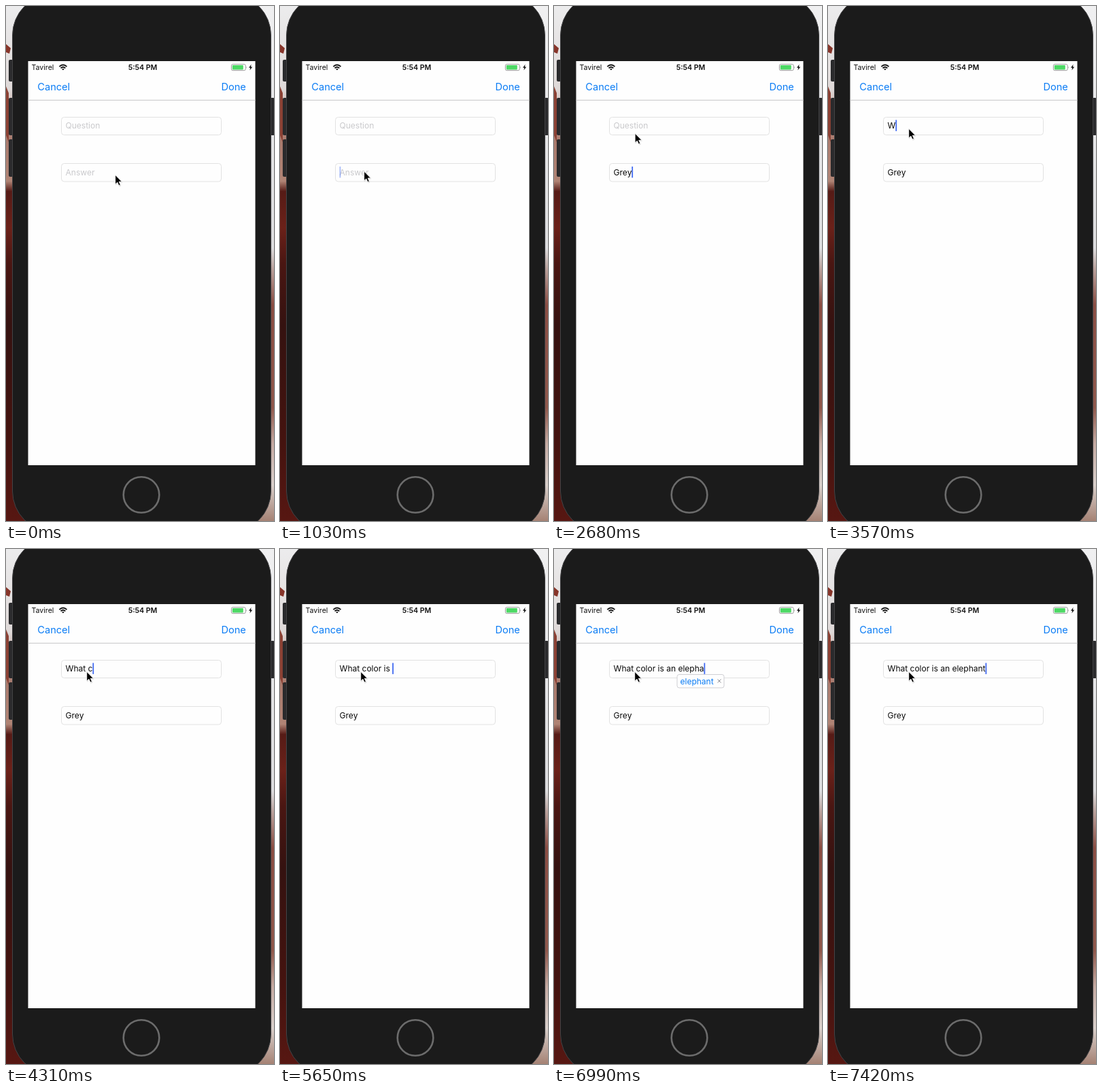
An HTML page for the animation above (8000 ms loop, 394 by 757 pixels).

```html
<!DOCTYPE html>
<html lang="en">
<head>
<meta charset="utf-8">
<title>Flashcard form</title>
<style>
  html, body { margin: 0; width: 100%; height: 100%; overflow: hidden; background: #e8e8e9; }
  svg { display: block; width: 100vw; height: 100vh; }
  text { font-family: Inter, Roboto, sans-serif; white-space: pre; }
  .nav { font-size: 14.6px; fill: #0a7cf5; }
  .status { font-size: 10.6px; fill: #111; }
  .field { font-size: 12px; }
  .box { fill: #fefefe; stroke: #e2e2e2; }
</style>
</head>
<body>
<svg viewBox="0 0 394 757">
  <defs>
    <linearGradient id="left" x2="0" y2="1">
      <stop offset="0" stop-color="#ececed"/>
      <stop offset=".16" stop-color="#dfd9d8"/>
      <stop offset=".26" stop-color="#a8796c"/>
      <stop offset=".34" stop-color="#b08475"/>
      <stop offset=".36" stop-color="#561b16"/>
      <stop offset=".43" stop-color="#6b2119"/>
      <stop offset=".5" stop-color="#4a1612"/>
      <stop offset=".62" stop-color="#351210"/>
      <stop offset=".85" stop-color="#45130f"/>
      <stop offset="1" stop-color="#571712"/>
    </linearGradient>
    <linearGradient id="right" x2="0" y2="1">
      <stop offset="0" stop-color="#f0f0f1"/>
      <stop offset=".47" stop-color="#dcdcde"/>
      <stop offset=".51" stop-color="#b9a19c"/>
      <stop offset=".58" stop-color="#8a4d43"/>
      <stop offset=".78" stop-color="#8f584c"/>
      <stop offset=".85" stop-color="#c4aaa2"/>
      <stop offset=".93" stop-color="#d8cfcb"/>
      <stop offset="1" stop-color="#a58274"/>
    </linearGradient>
  </defs>

  <rect width="197" height="757" fill="url(#left)"/>
  <rect x="197" width="197" height="757" fill="url(#right)"/>
  <path d="M0 56 7 62 5 70 0 68Z" fill="#87352a"/>
  <path d="M0 118 4 128V200L0 190Z" fill="#8b4134"/>

  <g fill="#2a2a2c">
    <rect x="4" y="79" width="9" height="32" rx="2"/>
    <rect x="4" y="135" width="9" height="55" rx="2"/>
    <rect x="4" y="196" width="9" height="55" rx="2"/>
    <rect x="386" y="135" width="9" height="55" rx="2"/>
  </g>
  <rect x="9.5" y="-17" width="380" height="790" rx="60" fill="#1b1b1b" stroke="#444446"/>
  <circle cx="199" cy="718.5" r="26.3" fill="none" stroke="#6c6c6c" stroke-width="2.6"/>
  <rect x="32.5" y="81" width="334" height="594" fill="#fefefe"/>
  <path d="M32.5 138.4H366.5" stroke="#c6c6c8"/>

  <text class="status" x="37.5" y="94">Tavirel</text>
  <text class="status" x="201" y="94" text-anchor="middle" font-weight="600">5:54 PM</text>
  <g fill="none" stroke="#111" stroke-width="1.9">
    <path d="M78.4 89.1Q83.9 83.8 89.4 89.1M80.5 91.4Q83.9 88.3 87.3 91.4"/>
    <path d="M82 92.6Q83.9 91.2 85.8 92.6L83.9 94.6Z" fill="#111" stroke="none"/>
  </g>
  <rect x="331.4" y="85.7" width="20.8" height="9" rx="2" fill="#fefefe" stroke="#8e8e8e" stroke-width=".9"/>
  <rect x="332.8" y="87" width="16" height="6.4" rx=".8" fill="#4cd964"/>
  <path d="M353.2 88.7Q354.6 90.2 353.2 91.7Z" fill="#8e8e8e"/>
  <path d="M360.6 85.8 357 90.7H359.2L358.4 94.6 362.2 89.4H359.9Z" fill="#111"/>

  <text class="nav" x="46.3" y="123.9">Cancel</text>
  <text class="nav" x="352.8" y="123.9" text-anchor="end">Done</text>

  <rect class="box" x="81.5" y="163.5" width="235" height="26" rx="4"/>
  <rect class="box" x="81.5" y="231.5" width="235" height="26.5" rx="4"/>
  <text class="field" id="question" x="87.6" y="180.4" xml:space="preserve"></text>
  <text class="field" id="answer" x="87.6" y="249" xml:space="preserve"></text>
  <rect id="caret" width="1.8" height="16.4" fill="#426bf2"/>

  <g id="suggestion">
    <rect x="181" y="184.5" width="69" height="19.5" rx="3" fill="#fefefe" stroke="#cfcfd3"/>
    <text class="field" x="185.5" y="198.6" fill="#0a7cf5">elephant</text>
    <path d="M240.5 191.5 245.5 196.5M245.5 191.5 240.5 196.5" stroke="#8e8e93"/>
  </g>

  <g id="pointer">
    <path d="M.6 1V15.6L4 12.6 6.2 17.6 9 16.4 6.8 11.5H11.2Z" fill="#000" opacity=".15"/>
    <path d="M.3 .3V14L3.5 11.2 5.6 16 8 15 5.9 10.3H10.2Z" fill="#000" stroke="#fff" stroke-width=".9"/>
  </g>
</svg>
<script>
  const LOOP = 8000;
  const el = id => document.getElementById(id);
  const question = el('question'), answer = el('answer'), caret = el('caret');
  const suggestion = el('suggestion'), pointer = el('pointer');

  // Each track is a list of [start time, value]; values hold until the next entry.
  const answerTrack = [[0, ''], [1630, 'G'], [1780, 'Gr'], [1930, 'Gre'], [2080, 'Grey']];
  const questionTrack = [
    [0, ''], [3570, 'W'], [3720, 'Wh'], [3870, 'What'], [4020, 'What '],
    ...typing('What ', [
      [4310, 'c'], [4460, 'co'], [4610, 'col'], [4760, 'color'], [4910, 'color '],
      [5060, 'color i'], [5210, 'color is'], [5650, 'color is ']]),
    ...typing('What color is ', [
      [5800, 'a'], [5950, 'an'], [6090, 'an '], [6240, 'an e'], [6540, 'an ele'],
      [6690, 'an elep'], [6840, 'an eleph'], [6990, 'an elepha'],
      [7280, 'an elephan'], [7420, 'an elephant']])
  ];
  const caretTrack = [[0, 0], [450, 1], [1030, .45], [1180, 0], [1630, 1]];
  const pointerTrack = [
    [0, [160.3, 248]], [300, [153, 247.5]], [450, [137, 245.5]], [590, [126, 243.5]], [730, [123.3, 242.7]],
    [2380, [122, 229]], [2530, [120, 206]], [2680, [118.8, 187]], [2820, [118.4, 180]]
  ];

  function typing(prefix, steps) {
    return steps.map(([time, text]) => [time, prefix + text]);
  }

  function valueAt(track, t) {
    let value = track[0][1];
    for (const [start, next] of track) if (start <= t) value = next;
    return value;
  }

  function setField(node, value, placeholder) {
    const text = value || placeholder;
    if (node.textContent !== text) node.textContent = text;
    node.setAttribute('fill', value ? '#0a0a0a' : '#c9c9cc');
    return value ? node.getComputedTextLength() : 0;
  }

  function render(t) {
    const questionWidth = setField(question, valueAt(questionTrack, t), 'Question');
    const answerWidth = setField(answer, valueAt(answerTrack, t), 'Answer');
    const onQuestion = t >= 2970;
    caret.setAttribute('x', 87.5 + (onQuestion ? questionWidth : answerWidth));
    caret.setAttribute('y', onQuestion ? 167.5 : 236);
    caret.setAttribute('opacity', valueAt(caretTrack, t));
    suggestion.setAttribute('visibility', t >= 6990 && t < 7420 ? 'visible' : 'hidden');
    pointer.setAttribute('transform', `translate(${valueAt(pointerTrack, t)})`);
  }

  const begin = performance.now();
  function tick() {
    render((performance.now() - begin) % LOOP);
    requestAnimationFrame(tick);
  }
  tick();
</script>
</body>
</html>
```
